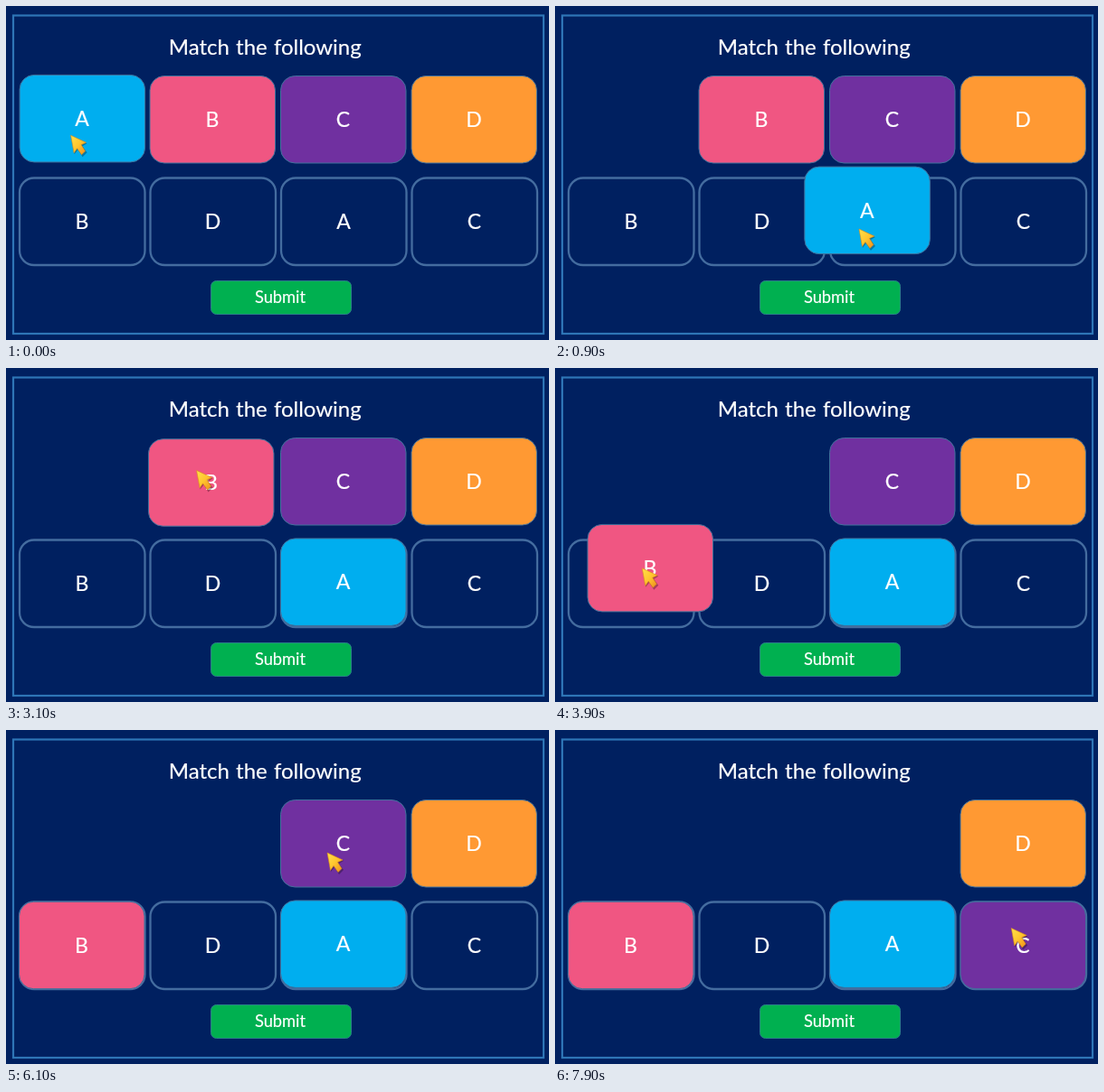
An HTML page for the animation above (8000 ms loop, 600 px wide and 370 px high).

```html
<!DOCTYPE html>
<html lang="en">
<head>
<meta charset="utf-8">
<title>Match the following</title>
<style>
  html, body { margin: 0; width: 100%; height: 100%; overflow: hidden; background: #002060; }
  svg { display: block; width: 600px; height: 370px; }
  text { font-family: Carlito, Lato, sans-serif; fill: #fff; stroke: #fff; stroke-width: .2; text-anchor: middle; font-size: 23px; }
  .title { font-size: 24px; word-spacing: 1px; }
  .submit { font-size: 18.3px; }
  .slot rect { stroke: #446c9f; stroke-width: 2.3; }
  .card rect { stroke: #41719c; stroke-width: 1; }
</style>
</head>
<body>
<svg viewBox="0 0 600 370">
  <defs>
    <linearGradient id="gold" x1="0" y1="0" x2="1" y2="1">
      <stop offset="0" stop-color="#ffe04a"/>
      <stop offset=".5" stop-color="#ffc52e"/>
      <stop offset="1" stop-color="#ee8a1c"/>
    </linearGradient>
  </defs>
  <rect width="600" height="370" fill="#002060"/>
  <rect x="8" y="10.5" width="586" height="352.5" fill="none" stroke="#2e75b6" stroke-width="2.2"/>
  <text class="title" x="286.3" y="53.5">Match the following</text>
  <g id="slots"></g>
  <rect x="226.5" y="304.5" width="155" height="37" rx="6" fill="#00b050" stroke="#2b7f88"/>
  <text class="submit" x="303" y="329">Submit</text>
  <g id="cards"></g>
  <g id="cursor">
    <path d="M1 1 18 9 13 12 18 19 13 24 8 16 4 21Z" fill="#000" opacity=".3"/>
    <path d="M0 0 17 8 11.5 10.5 16 17.5 12 21.5 7 14.5 3.5 19.5Z" fill="url(#gold)" stroke="#d98a1a" stroke-width=".6" stroke-linejoin="round"/>
  </g>
</svg>
<script>
const LOOP = 8000, STEP = 100, DRAG = 1150, TRAVEL = 1000;
const COLUMN_X = 15, COLUMN_GAP = 144.5, CARD_Y = 77.5, SLOT_Y = 190.5;
const slotOrder = 'BDAC';
const fills = { A: '#00aeef', B: '#f05682', C: '#7030a0', D: '#ff9933' };

// The pointer drags each card from grab to drop, then leaves for the next one.
const drags = [
  { name: 'A', start: -30, grab: [71, 143], drop: [364, 258], leave: 1900, lift: 1.3 },
  { name: 'B', start: 3030, grab: [212, 112], drop: [76, 241], leave: 4700, lift: 0 },
  { name: 'C', start: 6125, grab: [355, 136], drop: [503, 248], leave: 7580, lift: 0 }
];
const finish = [508, 130];

const progress = (t, start, duration) => {
  const u = Math.min(1, Math.max(0, (t - start) / duration));
  return u * u * (3 - 2 * u);
};
const mix = (from, to, k) => from.map((value, i) => value + (to[i] - value) * k);
const columnX = i => COLUMN_X + i * COLUMN_GAP;
const place = (node, [x, y]) => node.setAttribute('transform', `translate(${x} ${y})`);
const byId = id => document.getElementById(id);

function add(parent, tag, attributes, content = '') {
  const node = document.createElementNS('http://www.w3.org/2000/svg', tag);
  for (const name in attributes) node.setAttribute(name, attributes[name]);
  node.textContent = content;
  return parent.appendChild(node);
}

function addBox(kind, name, fill, position) {
  const group = add(byId(kind + 's'), 'g', { class: kind });
  add(group, 'rect', { width: 138.5, height: 96.5, rx: 16, fill });
  add(group, 'text', { x: 69, y: 56.5 }, name);
  place(group, position);
  return group;
}

[...slotOrder].forEach((name, i) => addBox('slot', name, 'none', [columnX(i), SLOT_Y]));

const cardNodes = {};
Object.keys(fills).forEach((name, i) => {
  cardNodes[name] = addBox('card', name, fills[name], [columnX(i) - .5, CARD_Y]);
});

drags.forEach((drag, i) => {
  drag.from = [columnX(i) - .5, CARD_Y - drag.lift];
  drag.to = [columnX(slotOrder.indexOf(drag.name)) - .5, SLOT_Y - .3 - drag.lift];
});

function draw(time) {
  const t = Math.floor((time % LOOP) / STEP) * STEP;
  let tip = drags[0].grab;
  drags.forEach((drag, i) => {
    const k = progress(t, drag.start, DRAG);
    place(cardNodes[drag.name], mix(drag.from, drag.to, k));
    if (t < drag.start) return;
    const next = drags[i + 1] ? drags[i + 1].grab : finish;
    tip = mix(mix(drag.grab, drag.drop, k), next, progress(t, drag.leave, TRAVEL));
  });
  place(byId('cursor'), tip);
}

const start = performance.now();
function tick() {
  draw(performance.now() - start);
  requestAnimationFrame(tick);
}
tick();
</script>
</body>
</html>
```
